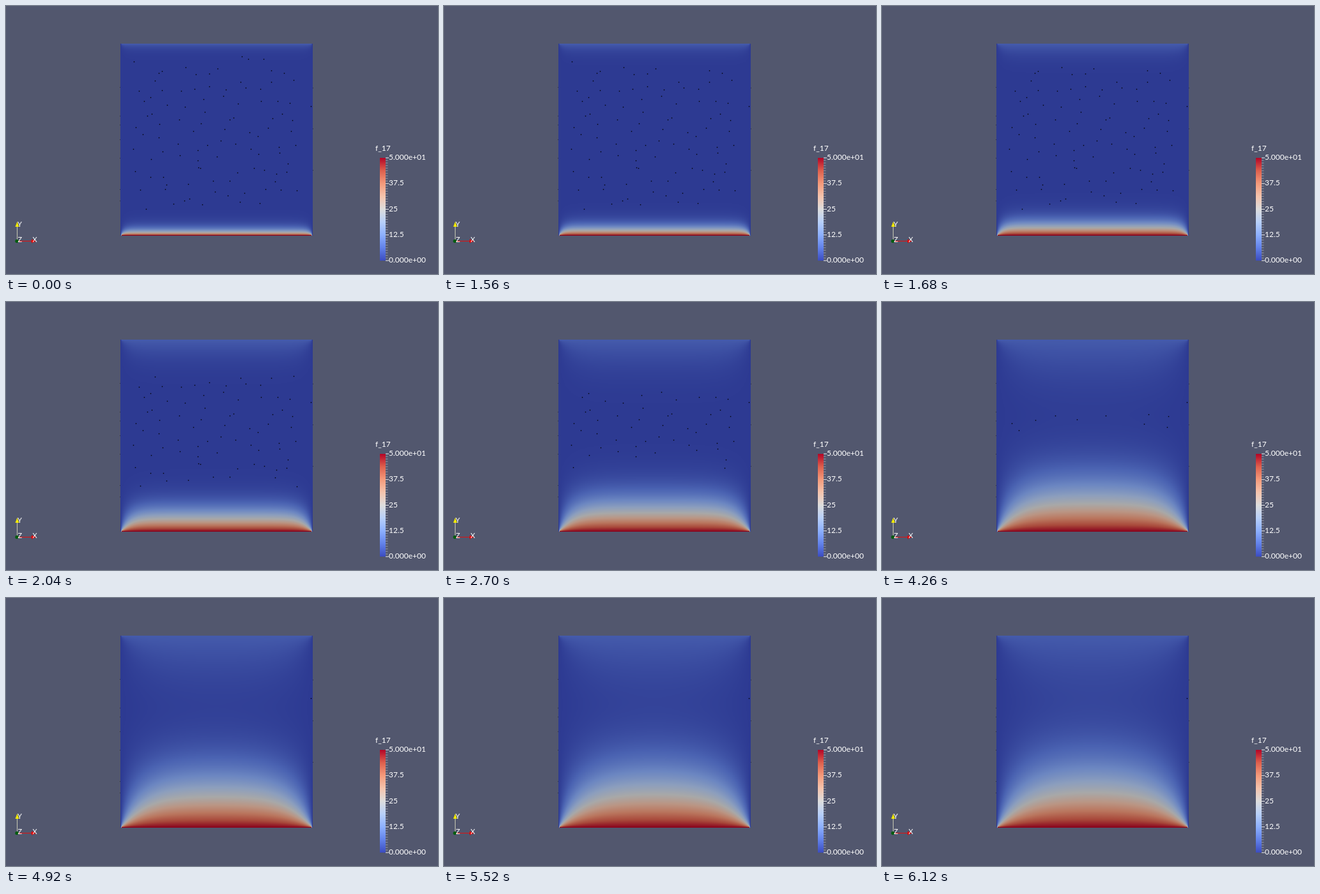
Recreate the animation shown at these times as an HTML page with a canvas. Size 676 px wide and 420 px high, loop 6660 ms.

```html
<!DOCTYPE html>
<html lang="en">
<head>
<meta charset="utf-8">
<title>Heat plate</title>
<style>
  html, body { margin: 0; width: 100%; height: 100%; overflow: hidden; background: #52576e; }
  svg, canvas { position: absolute; left: 0; top: 0; width: 676px; height: 420px; }
  text { font: 12px Lato, "Open Sans", sans-serif; fill: #fff; }
  .axis text { font-size: 11px; }
</style>
</head>
<body>
<svg viewBox="0 0 676 420">
  <defs><linearGradient id="scale" x1="0" y1="1" x2="0" y2="0"></linearGradient></defs>
  <g class="axis">
    <path d="M17.5 368V346" stroke="#c9c9b4" fill="none"/>
    <path d="M17.5 338l3 8h-6z" fill="#f0e800"/>
    <path d="M17 368.5H41" stroke="#e01010" fill="none"/>
    <path d="M47 368.5l-7-3v6z" fill="#e00000"/>
    <circle cx="17" cy="368.5" r="2.7" fill="#045c10"/>
    <text x="18" y="346">Y</text>
    <text x="18.5" y="370">Z</text>
    <text x="41.5" y="370">X</text>
  </g>
  <g id="legend">
    <text x="578" y="227">f_17</text>
    <rect x="585" y="238" width="9" height="161" fill="url(#scale)"/>
  </g>
</svg>
<canvas id="plate" width="676" height="420"></canvas>
<script>
const LOOP = 6660, HOLD = 1560, STEP = 60, STEPS = 78;
const LEFT = 179, TOP = 59, SIZE = 301, BASE = TOP + SIZE;
const N = 150, ROW = N + 1, DT = 0.0005;
const HOT = 1, WARM = 0.1, SHADE = 0.76;

// Diverging blue-white-red map
const COLORS = ['#3b4cc0', '#6282ea', '#8db0fe', '#b8d0f9', '#dddddd', '#f5c4ad', '#f49a7b', '#de604d', '#b40426'];
const RGB = COLORS.map(c => {
  const v = parseInt(c.slice(1), 16);
  return [v >> 16, v >> 8 & 255, v & 255];
});

function colorAt(v) {
  const p = v * 8, i = Math.min(Math.floor(p), 7);
  return RGB[i].map((c, k) => c + (RGB[i + 1][k] - c) * (p - i));
}

// Implicit heat steps: sine modes across the plate, tridiagonal solve upwards
function solveFields() {
  const fields = Array.from({ length: STEPS }, () => new Float32Array(ROW * ROW));
  const r = DT * N * N, up = new Float64Array(ROW), g = new Float64Array(ROW);
  for (let k = 1; k < N; k += 2) {
    const a = k * Math.PI / (2 * N);
    const weight = 2 / N / Math.tan(a);
    const diag = 1 + 2 * r + 4 * r * Math.sin(a) ** 2;
    const wave = Array.from({ length: N / 2 + 1 }, (_, j) => weight * Math.sin(2 * a * j));
    g.fill(0);
    g[0] = HOT;
    g[N] = WARM;
    for (const field of fields) {
      for (let i = 1; i < N; i++) {
        const m = diag - r * up[i - 1];
        up[i] = r / m;
        g[i] = (g[i] + r * g[i - 1]) / m;
      }
      for (let i = N - 1; i > 0; i--) g[i] += up[i] * g[i + 1];
      for (let i = 0; i <= N; i++) {
        for (let j = 0; j <= N / 2; j++) field[i * ROW + j] += wave[j] * g[i];
      }
    }
  }
  for (const field of fields) {
    for (let i = 0; i <= N; i++) {
      for (let j = 0; j < N / 2; j++) field[i * ROW + N - j] = field[i * ROW + j];
    }
  }
  return fields;
}

// Long-lived dots in the middle
const dots = [
  [311, 166], [221, 172], [228, 169], [240, 185], [271, 178], [305, 184], [293, 196], [350, 178],
  [356, 175], [342, 193], [381, 198], [394, 204], [410, 191], [417, 176], [432, 169], [448, 179],
  [446, 196], [203, 190], [214, 201], [239, 206], [199, 224], [453, 218], [227, 240], [245, 228],
  [269, 216], [272, 234], [300, 226], [300, 242], [315, 218], [336, 211], [330, 236], [359, 216],
  [383, 224], [395, 232], [427, 221], [428, 230], [441, 247]
];

let seed = 17;
const random = () => (seed = (seed * 16807) % 2147483647) / 2147483647;

// Short-lived dots in bands above and below
function scatter(count, y, height) {
  for (let i = 0; i < count; i++) {
    const x = 200 + (i + random()) * 256 / count;
    dots.push([Math.round(x), Math.round(y + random() * height)]);
  }
}
scatter(12, 79, 32);
scatter(12, 115, 19);
scatter(10, 140, 22);
scatter(15, 250, 34);
scatter(15, 286, 34);

const ctx = document.getElementById('plate').getContext('2d');
const image = ctx.createImageData(SIZE, SIZE);
const palette = Array.from({ length: 1025 }, (_, i) => colorAt(i / 1024).map(c => c * SHADE));
const fields = solveFields();

function dot(x, y) {
  ctx.fillRect(x - 0.2, y - 0.2, 1.4, 1.4);
}

function draw(n) {
  const field = fields[n], data = image.data;
  for (let y = 0, p = 0; y < SIZE; y++) {
    const h = SIZE - 1 - y;
    const low = (h >> 1) * ROW, high = (h + 1 >> 1) * ROW;
    for (let x = 0; x < SIZE; x++, p += 4) {
      const a = x >> 1, b = x + 1 >> 1;
      const v = (field[low + a] + field[low + b] + field[high + a] + field[high + b]) / 4;
      const c = palette[Math.max(0, Math.min(1024, Math.round(v * 1024)))];
      data[p] = c[0];
      data[p + 1] = c[1];
      data[p + 2] = c[2];
      data[p + 3] = 255;
    }
  }
  ctx.clearRect(0, 0, 676, 420);
  ctx.putImageData(image, LEFT, TOP);

  // Dots vanish as the two fronts close in, later near the sides
  const reach = Math.sqrt(n + 1);
  ctx.fillStyle = '#000';
  for (const [x, y] of dots) {
    const slack = Math.abs(x - 330) > 108 ? 15 : 0;
    if (y >= TOP + 17 * reach && y <= BASE - 24.6 * reach + slack) dot(x, y);
  }
  dot(477, 157);
  ctx.fillStyle = 'rgba(20,20,30,.6)';
  for (const y of [127, 172, 186, 209, 238, 287, 305]) ctx.fillRect(178, y, 1, 1);
  for (const y of [128, 192, 257]) ctx.fillRect(480, y, 1, 1);
}

function add(parent, tag, attrs, label = '') {
  const el = document.createElementNS('http://www.w3.org/2000/svg', tag);
  for (const key in attrs) el.setAttribute(key, attrs[key]);
  el.textContent = label;
  parent.append(el);
}

function buildLegend() {
  const scale = document.getElementById('scale'), legend = document.getElementById('legend');
  COLORS.forEach((c, i) => add(scale, 'stop', { offset: i / 8, 'stop-color': c }));
  for (let i = 0; i <= 40; i++) {
    const y = 238 + i * 4.025, major = i % 10 === 0;
    add(legend, 'path', {
      d: `M594 ${y}H${major ? 599 : 597.5}`, stroke: '#fff',
      'stroke-width': major ? 1 : 0.7, 'stroke-opacity': major ? 0.9 : 0.6
    });
  }
  ['5.000e+01', '37.5', '25', '12.5', '0.000e+00'].forEach((label, i) =>
    add(legend, 'text', { x: 599, y: 241 + i * 40.25 }, label));
}

buildLegend();
const start = performance.now();
let shown = -1;

function tick() {
  const t = (performance.now() - start) % LOOP;
  const n = t < HOLD ? 0 : Math.min(STEPS - 1, Math.floor((t - HOLD) / STEP) + 1);
  if (n !== shown) draw(shown = n);
  requestAnimationFrame(tick);
}
tick();
</script>
</body>
</html>
```
